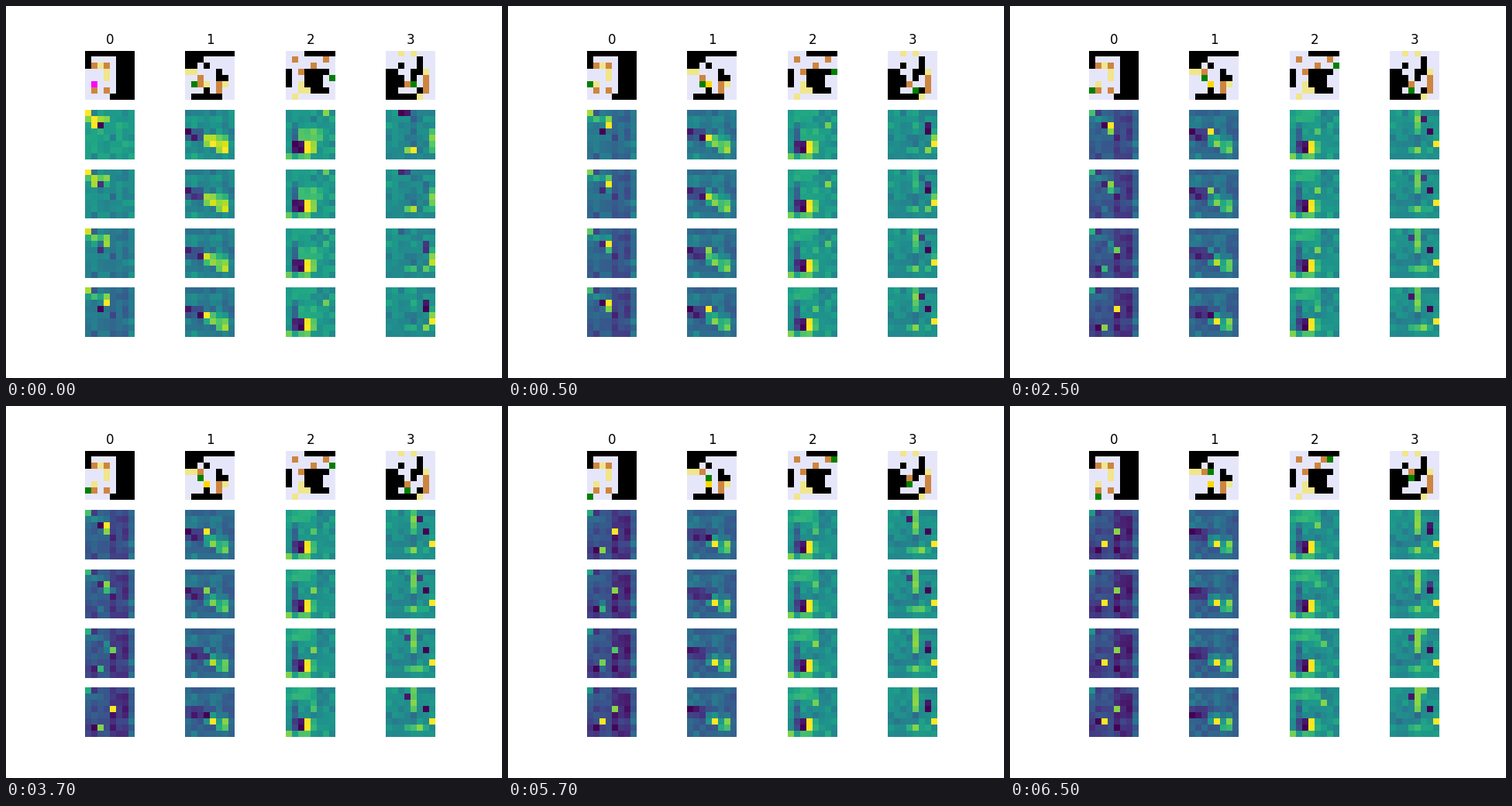
Animation of 640 by 480 pixels, one loop 8 s. Source, as a matplotlib script:

```python
import numpy as np
import matplotlib.pyplot as plt
from matplotlib.animation import FuncAnimation
from matplotlib.colors import to_rgb

SIZE = 8
LAST_STEP = 15
MOVES = {"L": (-1, 0), "R": (1, 0), "U": (0, -1), "D": (0, 1)}


def ease_out(t):
    return 1 - (1 - t) ** 3


def smooth(t):
    return t * t * (3 - 2 * t)


class Level:
    """A box-pushing room and the value maps of its player.

    Patches (x, y, w, h, start, end) drift between two values. Peaks and
    pits are spots that fade from cell to cell along a path.
    """

    def __init__(self, walls, targets, boxes, agent, moves,
                 drift, patches, peaks, pits, seed):
        self.walls, self.targets = walls, targets
        self.patches = [(0, 0, SIZE, SIZE, *drift)] + patches
        self.paths = [(0.82, peaks[1:]), (0.06, pits[1:]),
                      (1, peaks[:1]), (0, pits[:1])]
        self.grain = np.random.default_rng(seed).normal(0, 0.045, (2, SIZE, SIZE))
        self.states = [(agent, boxes)]
        for move in moves:
            self.states.append(self.push(*self.states[-1], MOVES[move]))

    @staticmethod
    def push(agent, boxes, step):
        ahead = (agent[0] + step[0], agent[1] + step[1])
        beyond = (ahead[0] + step[0], ahead[1] + step[1])
        return ahead, [beyond if box == ahead else box for box in boxes]

    def room(self, turn):
        image = np.empty((SIZE, SIZE, 3))
        image[:] = to_rgb("lavender")

        def paint(cell, color):
            image[cell[1], cell[0]] = to_rgb(color)

        for x, y, w, h in self.walls:
            image[y:y + h, x:x + w] = 0
        agent, boxes = self.states[turn]
        for cell in self.targets:
            paint(cell, "khaki")
        for cell in boxes:
            paint(cell, "gold" if cell in self.targets else "peru")
        paint(agent, "magenta" if agent in self.targets else "green")
        return image

    def values(self, step):
        t = step / LAST_STEP
        field = np.zeros((SIZE, SIZE))
        for x, y, w, h, start, end in self.patches:
            field[y:y + h, x:x + w] = start + (end - start) * ease_out(t)
        angle = t * np.pi / 2
        field += self.grain[0] * np.cos(angle) + self.grain[1] * np.sin(angle)

        for value, paths in self.paths:
            for path in paths:
                position = t * (len(path) - 1)
                weight = np.zeros((SIZE, SIZE))
                for i, (x, y) in enumerate(path):
                    weight[y, x] += smooth(max(0, 1 - abs(position - i)))
                field += (value - field) * weight
        return np.clip(field, 0, 1)


room_a = Level(
    walls=[(0, 0, 8, 1), (0, 1, 1, 2), (5, 1, 3, 7), (4, 7, 1, 1)],
    targets=[(2, 2), (3, 3), (3, 4), (1, 5)],
    boxes=[(1, 2), (3, 2), (1, 6), (3, 6)],
    agent=(1, 5), moves="LDDR",
    drift=(0.56, 0.22),
    patches=[(4, 1, 3, 7, 0.56, 0.1), (7, 0, 1, 8, 0.56, 0.32),
             (0, 1, 4, 1, 0.85, 0.28), (0, 0, 1, 1, 1, 0.6)],
    peaks=[[(1, 2), (3, 2), (3, 2), (4, 3), (2, 5), (2, 5)],
           [(3, 1), (3, 1), (3, 3), (2, 6), (4, 3), (4, 3)]],
    pits=[[(2, 2), (2, 3), (2, 2), (1, 6), (1, 6), (1, 5)]],
    seed=3)

room_b = Level(
    walls=[(0, 0, 8, 1), (0, 1, 3, 1), (0, 2, 2, 1), (3, 2, 1, 1),
           (5, 3, 1, 1), (5, 4, 2, 1), (3, 6, 1, 1), (1, 7, 5, 1)],
    targets=[(0, 3), (1, 3), (3, 5), (6, 5)],
    boxes=[(2, 4), (2, 5), (5, 5), (5, 6)],
    agent=(1, 5), moves="RURU",
    drift=(0.5, 0.32),
    patches=[(3, 4, 4, 2, 0.82, 0.45), (5, 5, 2, 2, 0.9, 0.6),
             (0, 3, 3, 2, 0.3, 0.18)],
    peaks=[[(4, 5), (3, 4), (3, 3), (4, 5), (4, 5), (4, 5)],
           [(3, 5), (4, 5), (4, 5), (6, 5), (6, 5), (6, 5)]],
    pits=[[(0, 3), (2, 4), (0, 3), (3, 4), (0, 3), (0, 4)],
          [(1, 4), (0, 3), (1, 4), (1, 4), (1, 3), (1, 4)]],
    seed=8)

room_c = Level(
    walls=[(3, 0, 5, 1), (0, 3, 1, 3), (3, 3, 4, 1), (3, 4, 3, 2), (4, 6, 3, 1)],
    targets=[(2, 5), (2, 6), (3, 6), (1, 7)],
    boxes=[(1, 1), (6, 1), (4, 2), (2, 3)],
    agent=(7, 4), moves="UUUL",
    drift=(0.53, 0.5),
    patches=[(0, 0, 5, 2, 0.5, 0.62), (2, 3, 4, 2, 0.74, 0.5),
             (1, 2, 1, 3, 0.38, 0.36), (4, 5, 1, 2, 0.82, 0.6),
             (2, 7, 2, 1, 0.65, 0.72), (0, 7, 1, 1, 0.7, 0.75),
             (1, 5, 1, 2, 0.03, 0.2), (3, 5, 1, 2, 1, 0.95)],
    peaks=[[(3, 6)], [(6, 0), (6, 2), (4, 3), (4, 2), (5, 2)]],
    pits=[[(2, 6)], [(2, 5)]],
    seed=12)

room_d = Level(
    walls=[(5, 1, 1, 3), (2, 2, 1, 1), (4, 3, 1, 2), (0, 3, 2, 1),
           (0, 4, 3, 2), (0, 6, 2, 1), (0, 7, 5, 1), (5, 6, 1, 1)],
    targets=[(2, 0), (4, 0), (6, 3), (5, 7)],
    boxes=[(3, 5), (6, 4), (6, 5), (6, 6)],
    agent=(4, 5), moves="DLUU",
    drift=(0.48, 0.5),
    patches=[(3, 2, 2, 4, 0.4, 0.42), (3, 6, 4, 1, 0.45, 0.63),
             (7, 3, 1, 4, 0.75, 0.5), (4, 0, 1, 4, 0.38, 0.8)],
    peaks=[[(4, 6)] + [(7, 5)] * 5,
           [(7, 4), (7, 4), (4, 1), (4, 2), (4, 1), (4, 0)],
           [(3, 6), (6, 6), (4, 6), (5, 6), (4, 6), (5, 0)]],
    pits=[[(2, 0)] + [(6, 3)] * 5,
          [(3, 0), (6, 2), (5, 1), (3, 1), (6, 2), (3, 1)]],
    seed=21)

levels = [room_a, room_b, room_c, room_d]
fig, axes = plt.subplots(5, 4, figsize=(6.4, 4.8), dpi=100)
for ax in axes.flat:
    ax.axis("off")
for number, ax in enumerate(axes[0]):
    ax.set_title(str(number))

rooms = [ax.imshow(level.room(0)) for ax, level in zip(axes[0], levels)]
maps = [[ax.imshow(level.values(0), cmap="viridis", vmin=0, vmax=1)
         for ax, level in zip(row, levels)] for row in axes[1:]]


def update(frame):
    turn = (frame + 3) // 4
    for image, level in zip(rooms, levels):
        image.set_data(level.room(turn))
    for row, images in enumerate(maps):
        for image, level in zip(images, levels):
            image.set_data(level.values(3 * turn + row))
    return rooms + sum(maps, [])


animation = FuncAnimation(fig, update, frames=16, interval=500, repeat=True)
plt.show()
```
